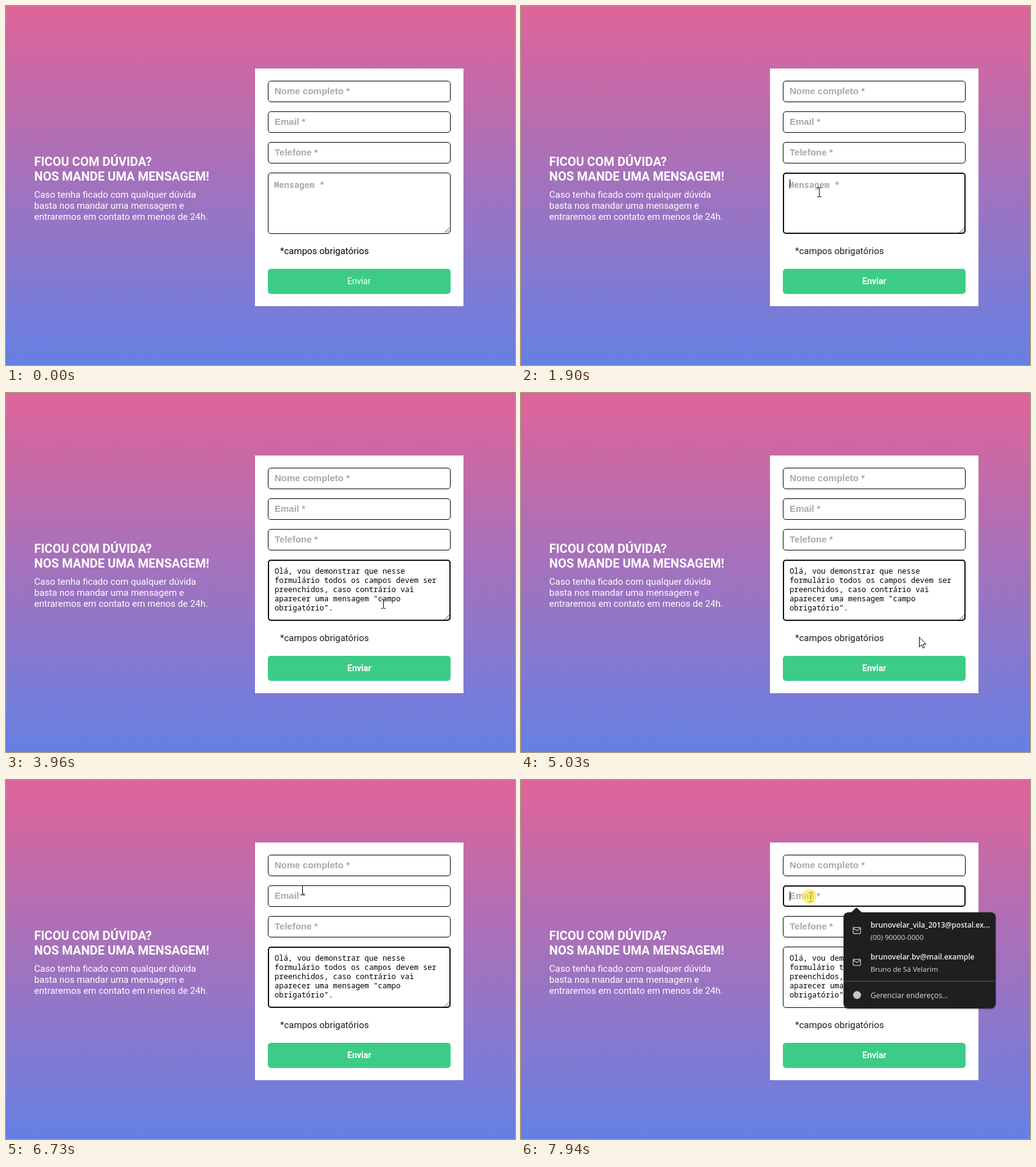
These frames come from a looping animation (830x586 px, 8000 ms). An HTML page with a canvas:

```html
<!DOCTYPE html>
<html lang="pt-BR">
<head>
<meta charset="utf-8">
<title>Formulário de contato</title>
<style>
  html, body { margin: 0; width: 100%; height: 100%; overflow: hidden; }
  canvas { display: block; }
</style>
</head>
<body>
<canvas id="stage" width="830" height="586"></canvas>
<script>
const ctx = document.getElementById('stage').getContext('2d', { alpha: false });
const LOOP = 8000, TICK = 68;
const PRESS = 1760, FOCUS = 1900, PASTE = 3020, POPUP = 7940;
const BLINK_START = 1850, BLINK = 541;

const ROBOTO = 'Roboto, sans-serif';
const ARIAL = '"Liberation Sans", Arial, sans-serif';
const MONO = '"Noto Sans Mono", monospace';
const UI = '"Open Sans", "Noto Sans", sans-serif';
const HINT = '#a9a9a9';

const LEFT = 427, WIDTH = 298, ROW = 50;
const hints = ['Nome completo *', 'Email *', 'Telefone *'];
const rowTop = i => 122 + ROW * i;
const rowHeight = i => i < hints.length ? 35 : 100;

const intro = [
  'Caso tenha ficado com qualquer dúvida',
  'basta nos mandar uma mensagem e',
  'entraremos em contato em menos de 24h.'
];
const message = [
  'Olá, vou demonstrar que nesse',
  'formulário todos os campos devem ser',
  'preenchidos, caso contrário vai',
  'aparecer uma mensagem "campo',
  'obrigatório".'
];
const contacts = [
  ['brunovelar_vila_2013@postal.ex...', '(00) 90000-0000'],
  ['brunovelar.bv@mail.example', 'Bruno de Sá Velarim']
];

// Each stroke is a Bezier curve that starts where the last one ended
const ENTRY = [698, 487];
const strokes = [
  { from: 530, to: 1290, curve: [[640, 435], [530, 320], [489, 307]] },
  { from: 1360, to: 1560, curve: [[488, 306], [487, 305], [486, 304]] },
  { from: 3770, to: 4160, curve: [[600, 330], [704, 370], [651, 412]] },
  { from: 5030, to: 5780, curve: [[626, 357], [836, 292], [576, 206]] },
  { from: 5850, to: 6590, curve: [[495, 122], [481, 171], [489, 174]] },
  { from: 6660, to: 7010, curve: [[484, 180], [477, 186], [472, 191]] }
];

function text(str, x, y, font, color) {
  ctx.font = font;
  ctx.fillStyle = color;
  ctx.fillText(str, x, y);
}

function lines(rows, x, y, step, font, color) {
  rows.forEach((row, i) => text(row, x, y + step * i, font, color));
}

function rounded(x, y, w, h, r) {
  ctx.beginPath();
  ctx.roundRect(x, y, w, h, r);
}

function disc(x, y, r, color) {
  ctx.fillStyle = color;
  ctx.beginPath();
  ctx.arc(x, y, r, 0, 2 * Math.PI);
  ctx.fill();
}

function poly(points) {
  ctx.beginPath();
  points.forEach(([x, y]) => ctx.lineTo(x, y));
  ctx.closePath();
}

function polyline(...points) {
  ctx.beginPath();
  points.forEach(([x, y]) => ctx.lineTo(x, y));
  ctx.stroke();
}

function field(i, focused) {
  const lw = focused ? 2 : 1;
  ctx.lineWidth = lw;
  ctx.strokeStyle = focused ? '#101010' : '#000';
  rounded(LEFT + lw / 2, rowTop(i) + lw / 2, WIDTH - lw, rowHeight(i) - lw, 5 - lw / 2);
  ctx.stroke();
}

function caret(x, y) {
  ctx.fillStyle = '#000';
  ctx.fillRect(x, y, 1, 15);
}

function drawPage() {
  const sky = ctx.createLinearGradient(0, 0, 0, 586);
  sky.addColorStop(0, '#df6498');
  sky.addColorStop(1, '#6580e3');
  ctx.fillStyle = sky;
  ctx.fillRect(0, 0, 830, 586);

  lines(['FICOU COM DÚVIDA?', 'NOS MANDE UMA MENSAGEM!'], 46, 261, 24, 'bold 20px ' + ROBOTO, '#fff');
  lines(intro, 46, 313, 18, '15px ' + ROBOTO, '#fff');

  ctx.fillStyle = '#fff';
  ctx.fillRect(406, 102, 340, 388);
}

function drawForm(t) {
  const active = t >= FOCUS, popup = t >= POPUP;
  const caretOn = active && Math.floor((t - BLINK_START) / BLINK) % 2 === 0;

  lines(hints, 438, 144, ROW, 'bold 15px ' + ARIAL, HINT);
  if (t < PASTE) {
    text('Mensagem *', 437, 297, 'bold 13.75px ' + MONO, HINT);
    if (caretOn) caret(438, 283);
  } else {
    lines(message, 438, 295, 15, '500 12.22px ' + MONO, '#000');
    if (caretOn && !popup) caret(533, 343);
  }

  ctx.lineWidth = 1;
  ctx.strokeStyle = '#444';
  polyline([715, 370], [723, 362]);
  polyline([719.5, 370], [723, 366.5]);

  const focus = popup ? 1 : active ? 3 : -1;
  for (let i = 0; i < 4; i++) field(i, i === focus);
  if (popup) caret(438, 182);

  text('*campos obrigatórios', 447, 405, '15px ' + ROBOTO, active ? '#1c1c1c' : '#000');
  ctx.fillStyle = '#3dcc87';
  rounded(LEFT, 429, WIDTH, 41, 5);
  ctx.fill();
  text('Enviar', 556.5, 454, (active ? 'bold' : 'normal') + ' 14px ' + ROBOTO, '#fff');
}

function envelope(x, y) {
  ctx.strokeStyle = '#c7c7c7';
  ctx.lineWidth = 1.3;
  rounded(x + 0.6, y + 0.6, 12, 10, 1);
  ctx.stroke();
  polyline([x + 1, y + 2], [x + 6.6, y + 6], [x + 12.2, y + 2]);
}

function drawPopup() {
  ctx.save();
  ctx.shadowColor = 'rgba(0,0,0,.35)';
  ctx.shadowBlur = 3;
  ctx.shadowOffsetY = 1;
  ctx.fillStyle = '#1f1f1f';
  rounded(526, 216, 248, 157, 8);
  ctx.fill();
  ctx.restore();
  ctx.fillStyle = '#1f1f1f';
  poly([[538, 216.5], [547, 208], [556, 216.5]]);
  ctx.fill();

  contacts.forEach(([mail, info], i) => {
    const y = 52 * i;
    envelope(541, 240 + y);
    text(mail, 570, 241 + y, '600 12px ' + UI, '#eee');
    text(info, 570, 261 + y, '11.6px ' + UI, '#dadada');
  });

  ctx.fillStyle = '#5c5c5c';
  ctx.fillRect(526, 328, 248, 1);
  disc(548, 351, 6.5, '#c7c7c7');
  text('Gerenciar endereços...', 570, 356, '12.1px ' + UI, '#dadada');
}

function bezier(a, b, c, d, u) {
  const v = 1 - u;
  return Math.round(v * v * v * a + 3 * v * v * u * b + 3 * v * u * u * c + u * u * u * d);
}

// The pointer moves in small even steps, the first one at once
function pointerAt(t) {
  const i = strokes.filter(s => s.from <= t).length - 1;
  const { from, to, curve: [b, c, d] } = strokes[i];
  const a = i ? strokes[i - 1].curve[2] : ENTRY;
  const gaps = Math.round((to - from) / TICK);
  const done = Math.min(1, (t - from) / (to - from));
  const u = (Math.floor(done * gaps + 0.01) + 1) / (gaps + 1);
  return [0, 1].map(k => bezier(a[k], b[k], c[k], d[k], u));
}

function drawBeam(x, y) {
  ctx.fillStyle = '#000';
  for (const dy of [-8, 7]) {
    ctx.fillRect(x - 3, y + dy, 3, 1);
    ctx.fillRect(x + 1, y + dy, 3, 1);
  }
  ctx.fillRect(x, y - 7, 1, 14);
}

function drawArrow(x, y) {
  ctx.save();
  ctx.translate(x + 0.5, y + 0.5);
  poly([[0, 0], [0, 16], [3.6, 12.6], [6.2, 18], [8.4, 17], [6, 11.5], [11, 11.5]]);
  ctx.fillStyle = '#fff';
  ctx.fill();
  ctx.lineWidth = 1;
  ctx.strokeStyle = '#000';
  ctx.stroke();
  ctx.restore();
}

function overField(x, y) {
  return x >= LEFT && x < LEFT + WIDTH &&
    [0, 1, 2, 3].some(i => y >= rowTop(i) && y < rowTop(i) + rowHeight(i));
}

function drawPointer(t) {
  if (t < strokes[0].from) return;
  const [x, y] = pointerAt(t);
  (overField(x, y) ? drawBeam : drawArrow)(x, y);
  const pressed = (t >= PRESS && t < FOCUS) || t >= POPUP;
  if (pressed) disc(x - 2, y - 1, 12, 'rgba(250,232,60,.65)');
}

function render(t) {
  drawPage();
  drawForm(t);
  if (t >= POPUP) drawPopup();
  drawPointer(t);
}

const began = performance.now();
function loop() {
  render((performance.now() - began) % LOOP);
  requestAnimationFrame(loop);
}
loop();
</script>
</body>
</html>
```
